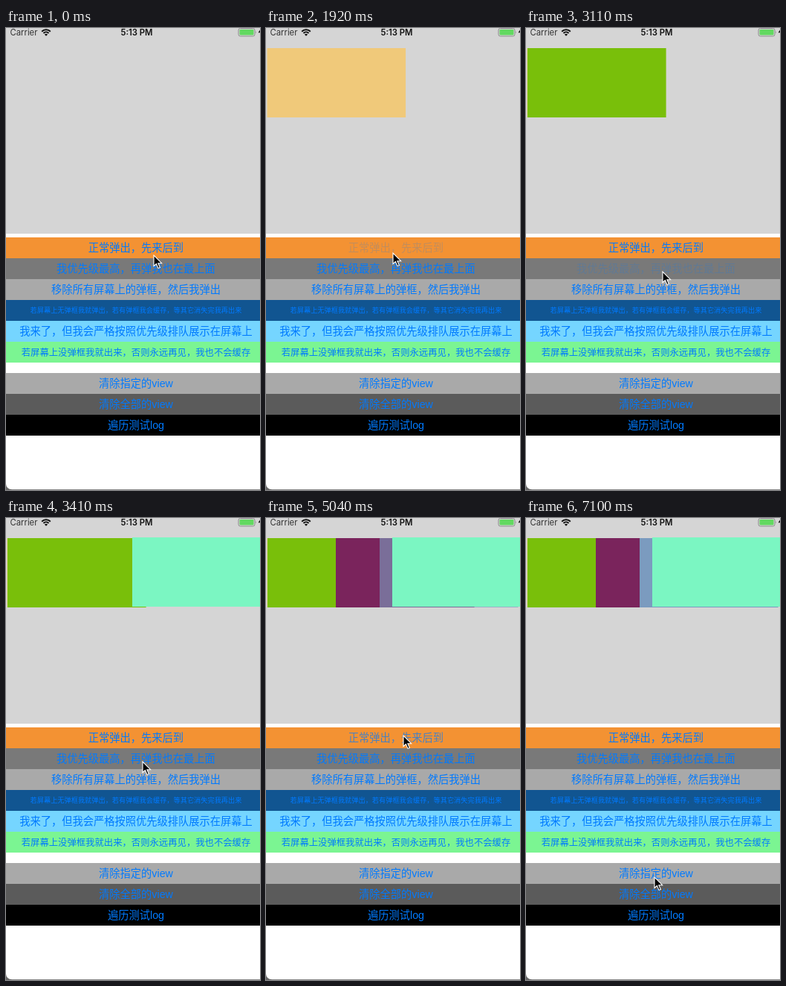
Animation, 342 px wide and 620 px high, one loop 8000 ms. Source, as an HTML page:

```html
<!DOCTYPE html>
<html lang="zh-CN">
<head>
<meta charset="utf-8">
<style>
  html, body { margin: 0; width: 100%; height: 100%; overflow: hidden; background: #fff; }
  svg { display: block; width: 100%; height: 100%; }
  #rows { font-family: "Liberation Sans", "Noto Sans CJK SC", "Noto Sans CJK", sans-serif; font-weight: 350; text-anchor: middle; fill: #007aff; }
  .bar text { font: 400 11.3px Inter, "Liberation Sans", sans-serif; fill: #333; }
  .bar .time { font-weight: 600; fill: #111; text-anchor: middle; }
</style>
</head>
<body>
<svg viewBox="0 0 342 620">
  <rect width="342" height="620" fill="#fff"/>
  <rect width="342" height="276" fill="#d5d5d5"/>
  <g class="bar">
    <text x="5.5" y="10">Carrier</text>
    <g fill="none" stroke="#111" stroke-width="2">
      <path d="M48.2 4.7a8.2 8.2 0 0 1 11.6 0"/>
      <path d="M50.5 7a5 5 0 0 1 7 0"/>
    </g>
    <path d="M54 10.8L51.9 8.7a3 3 0 0 1 4.2 0Z" fill="#111"/>
    <text class="time" x="176" y="10">5:13 PM</text>
    <rect x="313" y=".5" width="22" height="10.5" rx="2.5" fill="none" stroke="#8c8c8c"/>
    <rect x="314.5" y="2" width="19" height="7.5" rx="1.2" fill="#62d960"/>
    <path d="M336 4q1.6 1.7 0 3.6Z" fill="#8c8c8c"/>
    <path d="M342 2.5L339.6 6.3H342Z" fill="#111"/>
  </g>
  <g id="rows"></g>
  <g id="views"></g>
  <path d="M0 612Q.5 619 8 619.2H342V620H0Z" fill="#666"/>
  <path id="cursor" d="M0 0V14.5L3.4 11.5L6 17.4L8.4 16.4L5.8 10.7H10.6Z" fill="#000" stroke="#fff" stroke-width="1.1"/>
</svg>
<script>
const LOOP = 8000, TICK = 148, ROW = 28;

const rows = [
  { color: '#f39233', label: '正常弹出，先来后到' },
  { color: '#797979', label: '我优先级最高，再弹我也在最上面' },
  { color: '#a9a9a9', label: '移除所有屏幕上的弹框，然后我弹出' },
  { color: '#115591', label: '若屏幕上无弹框我就弹出，若有弹框我会缓存，等其它消失完我再出来', size: 9.2 },
  { color: '#75d5ff', label: '我来了，但我会严格按照优先级排队展示在屏幕上' },
  { color: '#7bf592', label: '若屏幕上没弹框我就出来，否则永远再见，我也不会缓存', size: 12.35 },
  { color: '#a9a9a9', label: '清除指定的view' },
  { color: '#5b5b5b', label: '清除全部的view' },
  { color: '#000', label: '遍历测试log' }
];

// Each tap dims its row label and pops up one view; row 1 stays on top.
const taps = [
  { tick: 6, row: 0, x: 1.5, y: 27, color: '#f0c97a' },
  { tick: 13, row: 0, x: 2, y: 27, color: '#79bf0a' },
  { tick: 32, row: 0, x: 94, y: 27, color: '#7a245c' },
  { tick: 33, row: 0, x: 153, y: 27, color: '#7b9bbf' },
  { tick: 21, row: 1, x: 170, y: 26, color: '#7bf6c2' }
];

// Cursor strokes; bow bends a stroke to the right.
const home = { x: 199, y: 305 };
const moves = [
  { from: 0, to: 3, x: 164, y: 295 },
  { from: 8, to: 11, x: 171, y: 302 },
  { from: 13, to: 18, x: 184, y: 327, bow: 22 },
  { from: 28, to: 30, x: 185, y: 292 },
  { from: 37, to: 45, x: 195, y: 473, bow: 10 },
  { from: 45, to: 48, x: 173, y: 482 }
];

const $ = id => document.getElementById(id);
const clamp = v => Math.min(1, Math.max(0, v));
const mix = (a, b, k) => a + (b - a) * k;

function add(parent, tag, attrs, text = '') {
  const el = document.createElementNS('http://www.w3.org/2000/svg', tag);
  for (const k in attrs) el.setAttribute(k, attrs[k]);
  el.textContent = text;
  return parent.appendChild(el);
}

const labels = rows.map(({ color, label, size = 14.25 }, i) => {
  const y = 281 + ROW * i + (i > 5 ? ROW / 2 : 0);
  add($('rows'), 'rect', { y, width: 342, height: ROW, fill: color });
  return add($('rows'), 'text', { x: 175, y: y + ROW / 2 + size * 0.37, 'font-size': size }, label);
});

const boxes = taps.map(({ x, y, color }) =>
  add($('views'), 'rect', { x, y, width: 186.6, height: 93, fill: color }));

// Ease-out over two ticks after a tap.
function fade(age) {
  const k = 1 - clamp(age / 2);
  return 1 - k ** 1.4;
}

function cursorAt(n) {
  let { x, y } = home;
  for (const m of moves) {
    const k = clamp((n - m.from) / (m.to - m.from));
    x = mix(x, m.x, k) + (m.bow || 0) * Math.sin(Math.PI * k);
    y = mix(y, m.y, k);
  }
  return [x, y];
}

function draw(t) {
  const n = Math.floor((t + 10) / TICK);
  boxes.forEach((box, i) => box.setAttribute('opacity', fade(n - taps[i].tick)));
  labels.forEach((label, i) => {
    const glow = taps.filter(tap => tap.row === i && tap.tick <= n).map(tap => fade(n - tap.tick));
    label.setAttribute('opacity', mix(0.2, 1, Math.min(1, ...glow)));
  });
  $('cursor').setAttribute('transform', `translate(${cursorAt(n)})`);
}

const begin = performance.now();
function frame() {
  draw((performance.now() - begin) % LOOP);
  requestAnimationFrame(frame);
}
frame();
</script>
</body>
</html>
```
